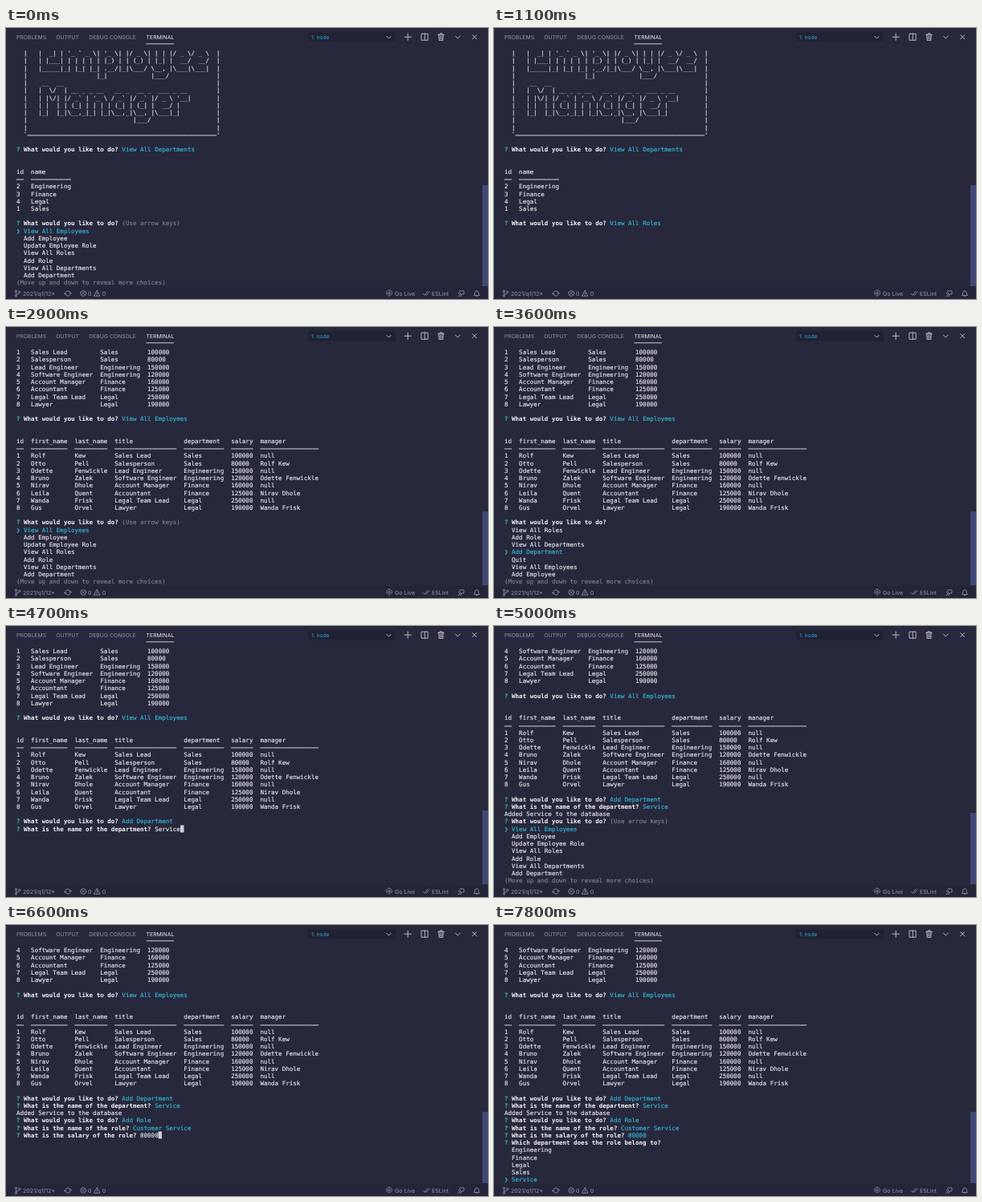
An HTML page that plays this animation: 600 px wide and 338 px high, repeating every 8 s.

```html
<!DOCTYPE html>
<html lang="en">
<head>
<meta charset="utf-8">
<title>Employee manager terminal</title>
<style>
  html, body { margin: 0; width: 100%; height: 100%; overflow: hidden; background: #27283c; }
  #stage { position: relative; width: 600px; height: 338px; overflow: hidden; }
  svg { position: absolute; inset: 0; font: 6.85px Inter, sans-serif; text-rendering: geometricPrecision; }
  .icon { fill: none; stroke: currentColor; stroke-width: .9; stroke-linecap: round; stroke-linejoin: round; }
  /* Laid out at double size so that fractional glyph advances survive. */
  #screen {
    position: absolute; left: 12.6px; top: 26.5px; margin: 0; color: #e6e6ec;
    font: 15.05px/18.46px "DejaVu Sans Mono", monospace; text-rendering: geometricPrecision;
    -webkit-text-stroke: .3px; transform: scale(.5); transform-origin: 0 0;
  }
  #screen div { height: 18.46px; white-space: pre; }
  #screen b { color: #f4f4f8; -webkit-text-stroke: 0; }
  #screen .mark { color: #3fb58a; font-weight: bold; }
  #screen .cyan { color: #35b6d6; }
  #screen .dim { color: #7e7e8e; }
  #screen .cursor { background: #cfcfd8; }
  #screen .pointer { display: inline-block; width: 2ch; }
  #thumb { position: absolute; right: 0; bottom: 16px; width: 7px; background: #424876; }
</style>
</head>
<body>
<div id="stage">
  <svg width="600" height="338" viewBox="0 0 600 338">
    <rect y="323" width="600" height="15" fill="#242538"/>
    <g fill="#9293a6">
      <text x="13" y="13.8">PROBLEMS</text>
      <text x="62.3" y="13.8">OUTPUT</text>
      <text x="103.3" y="13.8">DEBUG CONSOLE</text>
      <text x="174.6" y="13.8" fill="#e8e8ee">TERMINAL</text>
    </g>
    <path d="M174.5 19.8H209" stroke="#c9c9d4"/>
    <rect x="376" y="5.5" width="109" height="12" fill="#202133"/>
    <text x="380" y="14" font-size="6.7" fill="#2fa6da">1: node</text>
    <g class="icon" color="#c6c6d2">
      <path d="M473.8 10.4l2.7 2.7 2.7-2.7"/>
      <path d="M496 11.2h8.4M500.2 7v8.4"/>
      <path d="M517.4 7.2h7.8v8h-7.8zM521.3 7.2v8"/>
      <path d="M537.8 8.3h7.4M540 8.2V6.9h3v1.3M538.7 8.5l.4 6.9h4.8l.4-6.9M540.5 10v4M542.5 10v4"/>
      <path d="M559.3 10l3 3 3-3"/>
      <path d="M580.6 8.6l5.2 5.2M585.8 8.6l-5.2 5.2"/>
    </g>
    <g class="icon" color="#8b8ca0" stroke-width=".8">
      <circle cx="12.4" cy="328.2" r="1.2"/><circle cx="12.4" cy="334.2" r="1.2"/><circle cx="16.6" cy="329.4" r="1.2"/>
      <path d="M12.4 329.5v3.4M16.6 330.7q0 1.5-4 1.5"/>
      <path d="M73.6 330.4a3.6 3.6 0 0 1 6.8 0M80.4 331.8a3.6 3.6 0 0 1-6.8 0M79 330.6h2.6M75 331.6h-2.6"/>
      <circle cx="96.3" cy="331" r="3.4"/><path d="M95 329.7l2.6 2.6M97.6 329.7l-2.6 2.6"/>
      <path d="M113.4 327.6l3.6 6.6h-7.2zM113.4 330v2M113.4 333.2v.1"/>
      <path d="M475 333.4a3.5 3.5 0 1 1 4 0M475.8 331.7a1.5 1.5 0 1 1 2.4 0M477 330.8v3.9"/>
      <path d="M519 331.4l1.8 2 3.8-4.8M522.4 332.6l.8.8 3.8-4.8"/>
      <path d="M564.6 327.9h5.4v4h-2l-1.6 1.8v-1.8M564.6 332.2a1.3 1.3 0 1 0-.1 0M562.6 334.6q1.8-2 3.8 0"/>
      <path d="M582.8 333.2q1-1 1-3.2a2.2 2.2 0 0 1 4.4 0q0 2.2 1 3.2zM585.2 334.6h1.6"/>
    </g>
    <g fill="#9798ab" font-size="7.1">
      <text x="21" y="333.7">2021/q1/12*</text>
      <text x="102" y="333.7">0</text>
      <text x="119.8" y="333.7">0</text>
      <text x="484" y="333.7">Go Live</text>
      <text x="530" y="333.7">ESLint</text>
    </g>
  </svg>
  <pre id="screen"></pre>
  <div id="thumb"></div>
</div>

<template id="banner">
  |   |  _| | '_ ` _ \| '_ \| |/ _ \| | | |/ _ \/ _ \  |
  |   | |___| | | | | | |_) | | (_) | |_| |  __/  __/  |
  |   |_____|_| |_| |_| .__/|_|\___/ \__, |\___|\___|  |
  |                   |_|            |___/             |
  |    __  __                                          |
  |   |  \/  | __ _ _ __   __ _  __ _  ___ _ __        |
  |   | |\/| |/ _` | '_ \ / _` |/ _` |/ _ \ '__|       |
  |   | |  | | (_| | | | | (_| | (_| |  __/ |          |
  |   |_|  |_|\__,_|_| |_|\__,_|\__, |\___|_|          |
  |                             |___/                  |
  |                                                    |
  `————————————————————————————————————————————————————'
</template>

<script>
const LOOP = 8000, ROWS = 32, EARLIER_LINES = 43, TRACK = 296;
const screen = document.getElementById('screen');
const thumb = document.getElementById('thumb');

const paint = (name, text) => `<span class="${name}">${text}</span>`;
const ask = question => `${paint('mark', '?')} <b>${question}</b> `;
const answered = (question, reply) => ask(question) + paint('cyan', reply);
const typing = (question, text = '') => ask(question) + text + paint('cursor', ' ');
const KEYS_HINT = paint('dim', '(Use arrow keys)');

function table(header, rows) {
  const cells = [header, ...rows].map(row => row.split(','));
  const widths = cells[0].map((_, c) => Math.max(...cells.map(row => row[c].length)));
  const lines = cells.map(row => row.map((cell, c) => cell.padEnd(widths[c])).join('  '));
  lines.splice(1, 0, widths.map(w => '—'.repeat(w)).join('  '));
  return lines;
}

const choice = (text, active) => active
  ? paint('cyan', `<span class="pointer">❯</span>${text}`) : '  ' + text;

const TODO = 'What would you like to do?';
const DEPARTMENT = 'What is the name of the department?';
const ROLE = 'What is the name of the role?';
const SALARY = 'What is the salary of the role?';
const BELONGS = 'Which department does the role belong to?';
const ACTIONS = ['View All Employees', 'Add Employee', 'Update Employee Role', 'View All Roles',
  'Add Role', 'View All Departments', 'Add Department', 'Quit'];

// Seven choices are visible; the pointer stops in the middle and the list wraps around.
function menu(active, hint = '') {
  const first = Math.max(0, active - 3);
  const lines = [ask(TODO) + hint];
  for (let i = first; i < first + 7; i++) lines.push(choice(ACTIONS[i % ACTIONS.length], i === active));
  return [...lines, paint('dim', '(Move up and down to reveal more choices)')];
}
const freshMenu = () => menu(0, KEYS_HINT);

const departments = ['Engineering', 'Finance', 'Legal', 'Sales', 'Service'];
const departmentList = (active, hint = '') =>
  [ask(BELONGS) + hint, ...departments.map((name, i) => choice(name, i === active))];

const departmentTable = table('id,name', ['2,Engineering', '3,Finance', '4,Legal', '1,Sales']);
const roleTable = table('id,title,department,salary', [
  '1,Sales Lead,Sales,100000',
  '2,Salesperson,Sales,80000',
  '3,Lead Engineer,Engineering,150000',
  '4,Software Engineer,Engineering,120000',
  '5,Account Manager,Finance,160000',
  '6,Accountant,Finance,125000',
  '7,Legal Team Lead,Legal,250000',
  '8,Lawyer,Legal,190000']);
const employeeTable = table('id,first_name,last_name,title,department,salary,manager', [
  '1,Rolf,Kew,Sales Lead,Sales,100000,null',
  '2,Otto,Pell,Salesperson,Sales,80000,Rolf Kew',
  '3,Odette,Fenwickle,Lead Engineer,Engineering,150000,null',
  '4,Bruno,Zalek,Software Engineer,Engineering,120000,Odette Fenwickle',
  '5,Nirav,Dhole,Account Manager,Finance,160000,null',
  '6,Leila,Quent,Accountant,Finance,125000,Nirav Dhole',
  '7,Wanda,Frisk,Legal Team Lead,Legal,250000,null',
  '8,Gus,Orvel,Lawyer,Legal,190000,Wanda Frisk']);

const banner = document.getElementById('banner').content.textContent.split('\n').slice(1, -1);
const log = [...banner, ''];
const states = [];
let scroll = 0;

function show(at, live) {
  const lines = [...log, ...live];
  scroll = Math.max(scroll, lines.length - ROWS);
  states.push({ at, scroll, lines: lines.slice(scroll) });
}
const logTable = (action, lines) => log.push(answered(TODO, action), '', '', ...lines, '');

logTable('View All Departments', departmentTable);
show(0, freshMenu());
show(800, menu(2));
show(900, menu(3));
show(1100, [answered(TODO, 'View All Roles')]);

logTable('View All Roles', roleTable);
show(1200, freshMenu());

logTable('View All Employees', employeeTable);
show(1900, freshMenu());
show(3600, menu(6));

log.push(answered(TODO, 'Add Department'));
show(3900, [typing(DEPARTMENT)]);
show(4400, [typing(DEPARTMENT, 'S')]);
show(4700, [typing(DEPARTMENT, 'Service')]);

log.push(answered(DEPARTMENT, 'Service'), 'Added Service to the database');
show(5000, freshMenu());
show(5600, menu(4));

log.push(answered(TODO, 'Add Role'));
show(5700, [typing(ROLE)]);
show(5800, [typing(ROLE, 'Custo')]);
show(5900, [typing(ROLE, 'Customer Se')]);

log.push(answered(ROLE, 'Customer Service'));
show(6200, [typing(SALARY)]);
show(6500, [typing(SALARY, '800')]);
show(6600, [typing(SALARY, '80000')]);

log.push(answered(SALARY, '80000'));
show(7100, departmentList(0, KEYS_HINT));
show(7500, departmentList(4));

let current;
const start = performance.now();
function frame() {
  const t = (performance.now() - start) % LOOP;
  const state = states.findLast(s => s.at <= t);
  if (state !== current) {
    current = state;
    screen.innerHTML = state.lines.map(line => `<div>${line}</div>`).join('');
    thumb.style.height = TRACK * ROWS / (EARLIER_LINES + ROWS + state.scroll) + 'px';
  }
  requestAnimationFrame(frame);
}
frame();
</script>
</body>
</html>
```
